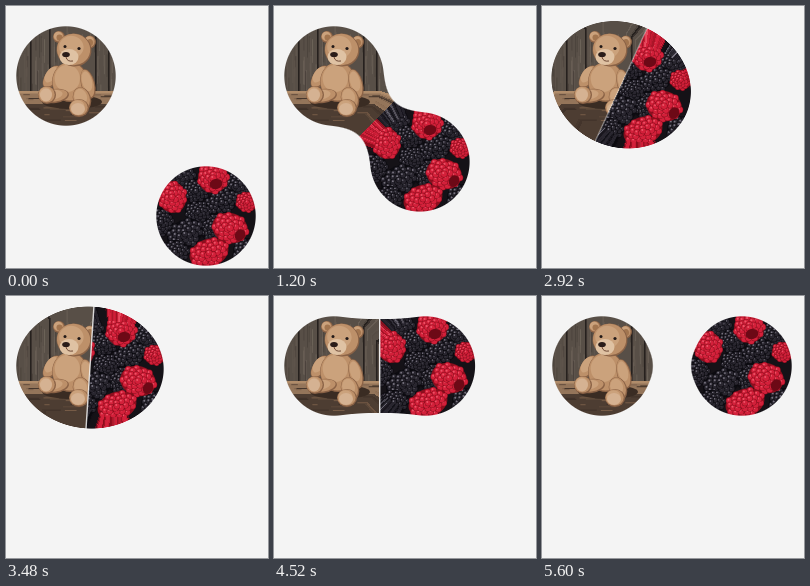
An HTML page with a canvas for the animation above (5680 ms loop, 262x262 px).

```html
<!DOCTYPE html>
<html lang="en">
<head>
<meta charset="utf-8">
<title>Merging circles</title>
<style>
  html, body { margin: 0; width: 100%; height: 100%; overflow: hidden; background: #f4f4f4; }
  canvas { display: block; width: 100vmin; height: 100vmin; }
</style>
</head>
<body>
<canvas id="stage" width="262" height="262"></canvas>
<script>
const SIZE = 262, RADIUS = 49.7, REACH = 100, BACK = 244;
const STEP = 40, LOOP = 5680, LAST = 140;
const HOME = { x: 60, y: 70 };
// Stops of the moving circle: step, x, y
const PATH = [[0, 200, 210], [61, 90, 100], [90, 110, 70], [LAST, 200, 70]];

const ctx = document.getElementById('stage').getContext('2d');
const image = ctx.createImageData(SIZE, SIZE);

let seed = 11;
const random = () => (seed = seed * 16807 % 2147483647) / 2147483647;

function texture(paint) {
  const canvas = document.createElement('canvas');
  canvas.width = canvas.height = 100;
  const g = canvas.getContext('2d');
  paint(g);
  return g.getImageData(0, 0, 100, 100).data;
}

function oval(g, color, x, y, rx, ry = rx, turn = 0) {
  g.fillStyle = color;
  g.beginPath();
  g.ellipse(x, y, rx, ry, turn, 0, Math.PI * 2);
  g.fill();
}

function box(g, color, x, y, w, h) {
  g.fillStyle = color;
  g.fillRect(x, y, w, h);
}

// A furry part: dark rim, body and a lit upper left
function plush(g, x, y, rx, ry, turn = 0) {
  oval(g, '#8a6246', x, y, rx, ry, turn);
  oval(g, '#bd9069', x - 0.4, y - 0.5, rx - 0.9, ry - 0.9, turn);
  oval(g, '#cba27c', x - rx * 0.15, y - ry * 0.18, rx * 0.7, ry * 0.68, turn);
}

function paintBear(g) {
  box(g, '#584f47', 0, 0, 100, 100);
  for (let i = 0; i < 90; i++) {
    const color = ['#6d6359', '#4a423b', '#61574e'][i % 3];
    box(g, color, random() * 100, random() * 60, 0.8, 8 + random() * 22);
  }
  for (const x of [14, 33, 79, 92]) box(g, '#26211e', x, 0, 1.6, 66);
  box(g, '#94755a', 0, 65, 100, 13);
  box(g, '#b08c6a', 0, 65, 100, 2.5);
  box(g, '#4d3d32', 0, 78, 100, 22);
  for (let i = 0; i < 45; i++) {
    const color = ['#7b5f49', '#5f4a3b', '#3c2f27'][i % 3];
    box(g, color, random() * 100, 68 + random() * 32, 5 + random() * 16, 0.9);
  }
  oval(g, '#3a2c23', 56, 76, 30, 7);

  plush(g, 36, 51, 7, 13, 0.6);
  plush(g, 54, 56, 18, 20);
  plush(g, 72, 58, 7, 15, -0.25);
  plush(g, 39, 70, 14, 7, -0.15);
  plush(g, 66, 73, 9, 12, -0.3);
  plush(g, 31, 69, 9, 9);
  oval(g, '#d5b292', 30, 69, 6, 6.5);
  plush(g, 63, 82, 10, 9);
  oval(g, '#d5b292', 62, 83, 7, 6);

  plush(g, 43, 11, 6, 6);
  plush(g, 74, 16, 6, 6.5);
  oval(g, '#a2754f', 43.5, 11.5, 3, 3);
  oval(g, '#a2754f', 74, 16.5, 3, 3.5);
  plush(g, 58, 24, 17.5, 16.5, 0.15);
  oval(g, '#dfc2a3', 53, 31, 9.5, 8);
  oval(g, '#2a1d1a', 50, 28.5, 3.8, 2.6);
  oval(g, '#231a18', 49, 20.5, 1.5);
  oval(g, '#231a18', 63, 22.5, 1.6);
  g.strokeStyle = '#6b4633';
  g.beginPath();
  g.moveTo(50, 31);
  g.quadraticCurveTo(51, 36, 57, 35);
  g.stroke();
}

const RED = ['#8c0f1e', '#d3203a', '#ec5568'];
const BLACK = ['#0c0b10', '#29262f', '#77737f'];

function berry(g, [rim, body, shine], x, y, rx, ry = rx, turn = 0) {
  oval(g, rim, x, y, rx, ry, turn);
  const count = 34, bead = Math.min(rx, ry) * 0.2;
  for (let i = count; i >= 0; i--) {
    const a = i * 2.39996, k = Math.sqrt(i / count) * 0.9;
    const u = Math.cos(a) * k * rx, v = Math.sin(a) * k * ry;
    const px = x + u * Math.cos(turn) - v * Math.sin(turn);
    const py = y + u * Math.sin(turn) + v * Math.cos(turn);
    oval(g, rim, px, py, bead + 0.5);
    oval(g, body, px, py, bead);
    oval(g, shine, px - bead * 0.25, py - bead * 0.35, bead * 0.34);
  }
}

function paintBerries(g) {
  box(g, '#151217', 0, 0, 100, 100);
  berry(g, BLACK, 24, 10, 15, 13);
  berry(g, BLACK, 80, 20, 14, 13);
  berry(g, BLACK, 5, 56, 12, 14);
  berry(g, BLACK, 40, 25, 13, 12);
  berry(g, BLACK, 55, 61, 12, 14);
  berry(g, BLACK, 92, 86, 15, 14);
  berry(g, BLACK, 66, 36, 18, 12, -0.4);
  berry(g, BLACK, 42, 46, 13, 11);
  berry(g, BLACK, 29, 68, 19, 14, -0.5);
  berry(g, BLACK, 19, 86, 14, 12);
  berry(g, RED, 91, 36, 11, 10);
  berry(g, RED, 16, 31, 14, 16, -0.3);
  berry(g, RED, 57, 12, 15, 15);
  oval(g, '#6d0916', 60, 18, 6.5, 5, -0.2);
  berry(g, RED, 74, 62, 18, 15, 0.3);
  oval(g, '#6d0916', 84, 69, 5, 6, 0.5);
  berry(g, RED, 53, 87, 20, 14, -0.35);
}

const bear = texture(paintBear);
const berries = texture(paintBerries);

const power = dd => Math.max(0, 1 - dd / (REACH * REACH)) ** 2.5;
const LEVEL = power(RADIUS * RADIUS);
const SOFT = 0.0162;

function place(step) {
  const i = PATH.findIndex(p => p[0] >= step) || 1;
  const [s0, x0, y0] = PATH[i - 1], [s1, x1, y1] = PATH[i];
  const k = (step - s0) / (s1 - s0);
  return { x: x0 + (x1 - x0) * k, y: y0 + (y1 - y0) * k };
}

// Texture offset for a point; past the rim the edge is drawn out in rays
function sample(dx, dy, dd) {
  const k = Math.min(1, 49 / Math.sqrt(dd));
  return (Math.floor(50 + dy * k) * 100 + Math.floor(50 + dx * k)) * 4;
}

function draw(step) {
  const ball = place(step), out = image.data;
  const gap = Math.hypot(ball.x - HOME.x, ball.y - HOME.y);
  const seam = Math.min(1, Math.max(0, (step - 61) / 29)) * 0.95;
  let o = 0;
  for (let y = 0; y < SIZE; y++) {
    for (let x = 0; x < SIZE; x++, o += 4) {
      const ax = x + 0.5 - HOME.x, ay = y + 0.5 - HOME.y;
      const bx = x + 0.5 - ball.x, by = y + 0.5 - ball.y;
      const aa = ax * ax + ay * ay, bb = bx * bx + by * by;
      let cover = (power(aa) + power(bb) - LEVEL) / SOFT + 0.5;
      cover = Math.min(1, Math.max(0, cover));
      let tex = bear, at = 0;
      if (cover > 0) {
        if (aa <= bb) at = sample(ax, ay, aa);
        else { tex = berries; at = sample(bx, by, bb); }
        const side = Math.abs(aa - bb) / (2 * gap);
        cover *= 1 - seam * Math.min(1, Math.max(0, 1.2 - side));
      }
      for (let c = 0; c < 3; c++) out[o + c] = BACK + (tex[at + c] - BACK) * cover;
      out[o + 3] = 255;
    }
  }
  ctx.putImageData(image, 0, 0);
}

let shown = -1;
function tick() {
  const step = Math.min(LAST, Math.floor(performance.now() % LOOP / STEP));
  if (step !== shown) draw(shown = step);
  requestAnimationFrame(tick);
}
tick();
</script>
</body>
</html>
```
